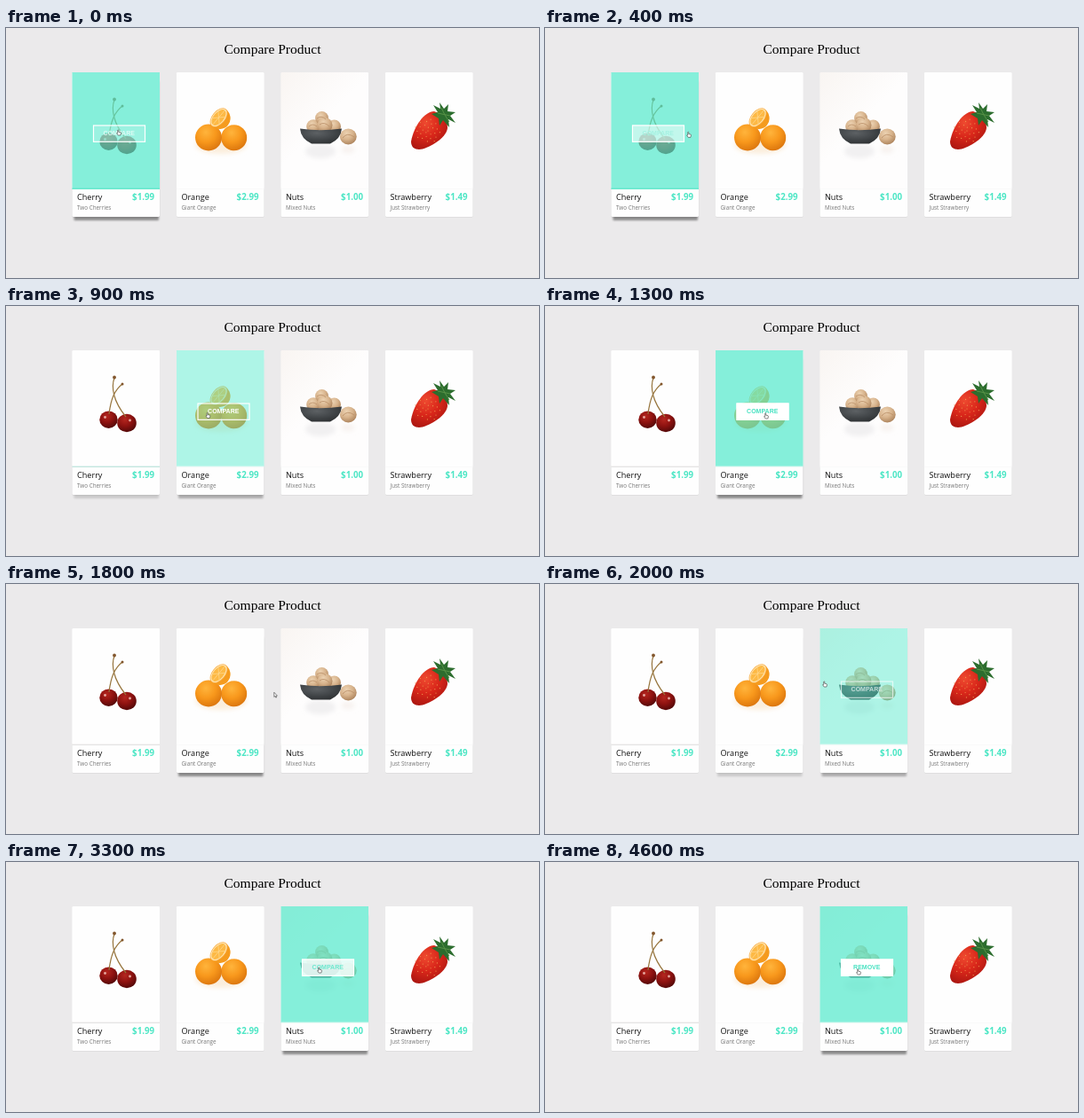
An HTML page that plays this animation: 600x282 px, repeating every 5 s.

```html
<!DOCTYPE html>
<html lang="en">
<head>
<meta charset="utf-8">
<title>Compare Product</title>
<style>
  html, body { margin: 0; width: 100%; height: 100%; overflow: hidden; background: #ebeaeb; }
  svg { display: block; width: 100%; height: 100%; }
  .title { font: 15.5px "Liberation Serif", serif; text-anchor: middle; }
  .name { font: 9.1px "Open Sans", sans-serif; fill: #111; }
  .note { font: 6.3px "Open Sans", sans-serif; fill: #777; }
  .price { font: bold 9.7px "Open Sans", sans-serif; fill: #4de6c5; text-anchor: end; }
  .label { font: bold 7px "Liberation Sans", sans-serif; text-anchor: middle; }
</style>
</head>
<body>
<svg id="stage" viewBox="0 0 600 282"></svg>
<script>
const LOOP = 5000, STEP = 100;
const CARD_W = 98.5;
const mixColor = (a, b, k) => `rgb(${a.map((v, i) => Math.round(v + (b[i] - v) * k))})`;
const WHITE = [255, 255, 255], GREY = [220, 218, 219], TEAL = [72, 226, 194];

// Linear interpolation through [time, value] points.
function track(points, t) {
  const next = points.findIndex(p => p[0] > t);
  if (next === 0) return points[0][1];
  if (next < 0) return points[points.length - 1][1];
  const [t0, a] = points[next - 1], [t1, b] = points[next];
  return a + (b - a) * (t - t0) / (t1 - t0);
}

const ball = (x, y, r, fill, ry = r) => `<ellipse cx="${x}" cy="${y}" rx="${r}" ry="${ry}" fill="${fill}"/>`;
const path = (d, attrs) => `<path d="${d}" ${attrs}/>`;
const balls = (list, fill) => list.map(([x, y, r, ry]) => ball(x, y, r, fill, ry)).join('');

function cherry() {
  const stem = 'fill="none" stroke="#96743c" stroke-width="1.2"';
  return balls([[115.5, 128.2, 10.2, 9.7], [136, 132, 10.8, 10.2]], 'url(#cherryTone)') +
    path('M122 81C118 92 121 108 135 125', stem) +
    path('M131 88C122 95 118 105 116 122', stem) +
    ball(122, 80.5, 1.9, '#82562d') + ball(131, 88, 1.5, '#82562d') +
    ball(111.5, 125.5, 1.4, '#e6a8a0') + ball(139.5, 129, 1.4, '#e6a8a0');
}

function orange() {
  return `<g filter="url(#soft)">${ball(242, 132, 29, '#fbeedd', 10)}</g>` +
    balls([[256.7, 123.7, 14.5], [228, 123.5, 15]], 'url(#orangeTone)') +
    '<g transform="translate(239.5 101) rotate(-50)">' +
    path('M-12.5 0A12.5 13.5 0 0 0 12.5 0Z', 'fill="#f59b1e"') +
    ball(0, 0, 12.5, '#f9b04a', 7.5) + ball(0, 0, 11.7, '#ffe6b4', 6.7) + ball(0, 0, 10.6, '#fdb945', 5.7) +
    path('M-10 0H10M-5 -5L5 5M5 -5L-5 5', 'stroke="#ffd88c" stroke-width=".7"') + '</g>';
}

function nuts() {
  return `<g filter="url(#soft)">${ball(354, 139, 17, '#f1f0f1', 8) + ball(385, 137, 8, '#f7f2ef', 4)}</g>` +
    balls([[346, 111, 7.8], [355.5, 101.5, 7.4], [369.5, 111, 7.5], [359, 109.5, 8.5],
      [385.3, 122.5, 9.4, 9]], 'url(#nutTone)') +
    path('M350 102Q355 98 360 103M353 109Q358 105 364 111M379 124Q384 117 392 123M341 111Q345 107 350 111',
      'fill="none" stroke="#b98f67" stroke-width=".8"') +
    path('M331 113.5Q354 117 378 113.5Q377 125 365 130.5H344Q332 125 331 113.5Z', 'fill="url(#bowlTone)"');
}

function strawberry() {
  let seeds = '';
  for (let i = 0; i < 26; i++) {
    const a = i * 2.4, r = Math.sqrt(i / 26);
    seeds += ball(475 + 15 * r * Math.cos(a), 116 + 14 * r * Math.sin(a), .6, '#ee9550');
  }
  return path('M482 94C471 94 459 111 456 128C456 136 462 138 469 136.5C481 133 497 122 497 112C497 103 490 97 482 94Z',
      'fill="url(#berryTone)"') + seeds +
    path('M479 97L486 95L481 87L489 91L488 84L493 91L498 86L497 94L506 95L500 99L506 107L498 103L499 112L492 104L488 110L487 102Z',
      'fill="#2c6d2e"') +
    path('M486 96L500 99M490 90L494 98L499 106', 'fill="none" stroke="#579247" stroke-width="1"');
}

const cards = [
  { name: 'Cherry', note: 'Two Cherries', price: '$1.99', art: cherry,
    veil: [[400, 1], [600, 0]], button: [[400, 1], [600, 0]],
    fill: [[0, .18], [200, 1], [300, 1], [500, 0]], shadow: [[700, 1], [1000, 0]] },
  { name: 'Orange', note: 'Giant Orange', price: '$2.99', art: orange,
    veil: [[700, 0], [1000, 1], [1500, 1], [1800, 0]],
    button: [[600, 0], [700, 1], [1500, 1], [1800, 0]],
    fill: [[900, 0], [1200, 1], [1500, 1], [1700, 0]],
    shadow: [[700, 0], [1000, 1], [1800, 1], [2100, 0]] },
  { name: 'Nuts', note: 'Mixed Nuts', price: '$1.00', art: nuts, backdrop: 'url(#warm)',
    veil: [[1800, 0], [2100, 1]], button: [[1800, 0], [2100, 1]],
    fill: [[3000, 0], [3300, .8], [3500, 1]], shadow: [[1800, 0], [2100, 1]] },
  { name: 'Strawberry', note: 'Just Strawberry', price: '$1.49', art: strawberry },
];
cards.forEach((card, i) => card.x = 74.5 + 117.5 * i);

const pointer = [[0, 127, 118], [200, 130, 119], [500, 178, 121], [700, 213, 123], [1200, 249, 124],
  [1500, 249, 124], [1700, 284, 125], [1800, 303, 125], [2000, 315, 113], [2400, 322, 86],
  [2900, 322, 86], [3200, 350, 119], [3300, 353, 122], [4400, 353, 124]];
const pointerX = pointer.map(([t, x]) => [t, x]);
const pointerY = pointer.map(([t, , y]) => [t, y]);

const tone = (id, light, main, dark) => `<radialGradient id="${id}" cx=".4" cy=".3" r=".75">
  <stop stop-color="${light}"/><stop offset=".5" stop-color="${main}"/><stop offset="1" stop-color="${dark}"/></radialGradient>`;
const blur = (id, size) => `<filter id="${id}" x="-30%" y="-30%" width="160%" height="160%">
  <feGaussianBlur stdDeviation="${size}"/></filter>`;

function cardMarkup({ x, name, note, price, art, backdrop = '#fefefe' }, i) {
  const middle = x + CARD_W / 2 + 3.5;
  return `
    <rect x="${x}" y="50.5" width="${CARD_W}" height="163" rx="1.5" fill="#000" opacity=".1" filter="url(#halo)"/>
    <rect id="shadow${i}" x="${x + 2}" y="60" width="${CARD_W - 3}" height="157" rx="1" fill="#000" filter="url(#drop)"/>
    <rect x="${x}" y="50" width="${CARD_W}" height="163" rx="1.5" fill="#fefefe"/>
    <rect x="${x}" y="50" width="${CARD_W}" height="131" rx="1.5" fill="${backdrop}"/>
    ${art()}
    <rect id="veil${i}" x="${x}" y="50" width="${CARD_W}" height="131.5" fill="rgb(80,233,203)"/>
    <rect id="line${i}" x="${x}" y="180.7" width="${CARD_W}" height="1" fill="#fafafa"/>
    <g id="button${i}">
      <rect id="fill${i}" x="${x + 23.5}" y="109.5" width="59" height="19.3" fill="#fff"/>
      <rect x="${x + 24}" y="110" width="58" height="18.3" fill="none" stroke="#fff" stroke-width="1.2"/>
      <text id="label${i}" class="label" x="${middle}" y="121.4">COMPARE</text>
    </g>
    <text class="name" x="${x + 5.5}" y="194.3">${name}</text>
    <text class="note" x="${x + 5.5}" y="204.6">${note}</text>
    <text class="price" x="${x + 92.5}" y="194.2">${price}</text>`;
}

document.getElementById('stage').innerHTML = `
  <defs>
    ${blur('drop', 1.3)} ${blur('halo', .7)} ${blur('soft', 2.5)}
    ${tone('cherryTone', '#b5261f', '#8d1210', '#4d0808')}
    ${tone('orangeTone', '#ffb43c', '#f8981c', '#d9730c')}
    ${tone('nutTone', '#ecd2b2', '#d8b48d', '#a97f58')}
    ${tone('berryTone', '#ee4a30', '#d9271a', '#a91510')}
    ${tone('bowlTone', '#5d6164', '#45494c', '#2d3032')}
    <linearGradient id="warm" x2=".8" y2="1"><stop stop-color="#f9f5f2"/><stop offset=".5" stop-color="#fefdfd"/></linearGradient>
  </defs>
  <text class="title" x="300" y="28.8">Compare Product</text>
  ${cards.map(cardMarkup).join('')}
  <g id="pointer" stroke="#444" stroke-width=".8" fill="#fff" stroke-linejoin="round">
    <path id="hand" d="M-1.6 -3.6Q-.8 -4.4 -.3 -3.5V-1L2.6 -.3Q3.2 0 3 1.2L2.3 3.8H-1L-3 .8Q-2.6 -.2 -1.6 .7Z"/>
    <path id="arrow" d="M-1.5 -3.5V3L0 1.8L1 4L2 3.5L1 1.4H3Z"/>
  </g>`;

const el = id => document.getElementById(id);

function drawCard(card, i, t) {
  const value = key => card[key] ? track(card[key], t) : 0;
  const fill = value('fill'), shadow = value('shadow');
  el('veil' + i).setAttribute('opacity', .69 * value('veil'));
  el('button' + i).setAttribute('opacity', value('button'));
  el('fill' + i).setAttribute('opacity', fill);
  el('label' + i).setAttribute('fill', mixColor(WHITE, TEAL, fill));
  el('shadow' + i).setAttribute('opacity', .4 * shadow);
  if (i === 0) el('line0').setAttribute('fill', mixColor(GREY, TEAL, shadow));
}

function draw(now) {
  const t = Math.floor(now % LOOP / STEP) * STEP;
  cards.forEach((card, i) => drawCard(card, i, t));
  el('label2').textContent = t < 3900 ? 'COMPARE' : 'REMOVE';

  const x = track(pointerX, t), y = track(pointerY, t);
  const overCard = cards.some(card => x >= card.x && x <= card.x + CARD_W);
  el('pointer').setAttribute('transform', `translate(${x} ${y}) scale(.8)`);
  el('hand').setAttribute('visibility', overCard ? 'visible' : 'hidden');
  el('arrow').setAttribute('visibility', overCard ? 'hidden' : 'visible');
}

const start = performance.now();
function frame() {
  draw(performance.now() - start);
  requestAnimationFrame(frame);
}
frame();
</script>
</body>
</html>
```
